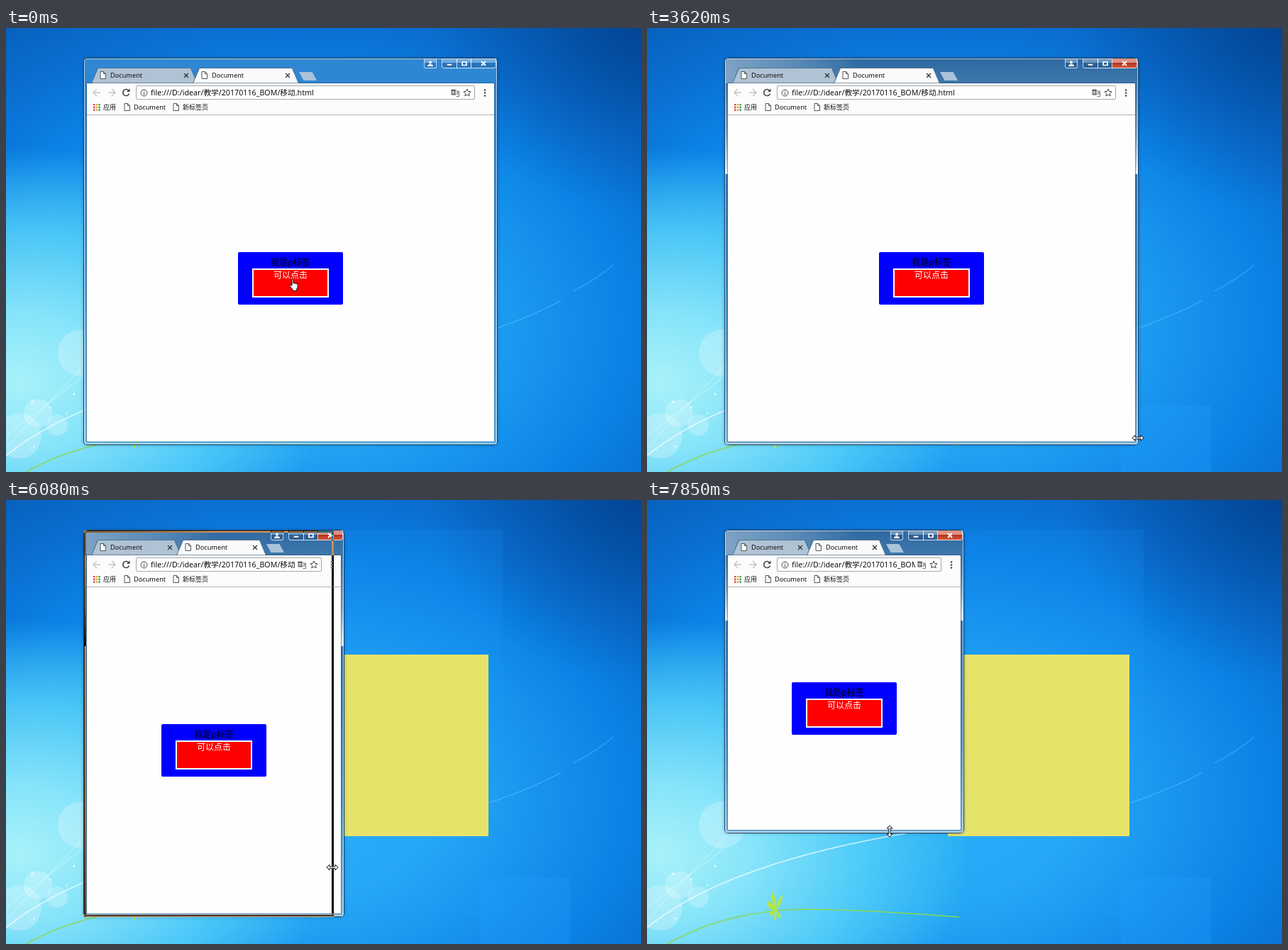
An HTML page that plays this animation: 895 by 626 pixels, repeating every 8 s.

```html
<!DOCTYPE html>
<html lang="zh">
<head>
<meta charset="utf-8">
<title>Document</title>
<style>
html, body { margin: 0; width: 100%; height: 100%; overflow: hidden; }
* { box-sizing: border-box; }
#stage {
  position: relative; width: 895px; height: 626px; overflow: hidden; isolation: isolate;
  font: 9.2px/12px "Noto Sans", "Noto Sans CJK SC", sans-serif; color: #111; white-space: nowrap;
  background:
    radial-gradient(430px 330px at 20px 500px, #a8f2fa 0, rgba(140,232,250,.95) 30%, rgba(90,214,250,.75) 66%, rgba(60,190,250,0)),
    radial-gradient(300px 260px at 895px 0, rgba(0,50,125,.55), rgba(0,50,125,0)),
    radial-gradient(910px 650px at 400px 420px, #2cb2f7 0, #26a9f4 23%, #1894ee 38%, #0b83e6 52%, #0a70d2 65%, #0660ba 80%, #034a96);
}
#stage * { position: absolute; }
#stage svg * { position: static; }
.wall { left: 0; top: 0; }
#win {
  left: 109px; top: 42px; width: calc(var(--r) - 109px); height: calc(var(--b) - 42px);
  border-radius: 6px 6px 5px 5px;
  background: linear-gradient(#2f87d3 36px, #3595e0 45%, rgba(120,200,240,.8));
  box-shadow: inset 0 0 0 1px #173f62, inset 0 0 0 2px rgba(255,255,255,.65), 0 0 4px rgba(0,30,70,.35);
}
#win.on {
  background:
    linear-gradient(115deg, rgba(190,210,225,.55) 0, rgba(150,185,210,.4) 95px, transparent 175px) 0 0 / 100% 36px no-repeat,
    linear-gradient(#2d68a3, #3f78ab 36px, #7fa6c6 20%, #e8f1f8 30%, #3474ac 30%, #4a8fc6 70%, #8cc0e0);
}
.tab {
  left: calc(11px + var(--i) * var(--s)); top: 14px; width: calc(var(--s) + 7px); height: 22px;
  background: #4d7395;
}
.tab, .tab::before { clip-path: polygon(0 100%, 9px 0, calc(100% - 9px) 0, 100% 100%); }
.tab::before { content: ""; position: absolute; inset: 1px 1px 0; background: #b0c3d5; }
.tab.front::before { background: #fafafa; }
.tab span { left: 27px; top: 5px; }
.plus {
  left: calc(18px + 2 * var(--s)); top: 20px; width: 25px; height: 12px; background: #a9c3da;
  clip-path: polygon(0 0, 74% 0, 100% 100%, 26% 100%);
}
.btn {
  top: 1px; height: 14px; border: 1px solid rgba(235,245,255,.75); border-top: 0;
  background: linear-gradient(rgba(255,255,255,.3) 50%, rgba(20,60,110,.25) 50%);
}
.on .close { background: linear-gradient(#d99384 50%, #b5321d 50%, #cf5a3c); }
.btn svg { left: 50%; top: 50%; margin: -5px 0 0 -5px; }
#page { inset: 36px 5px 5px; background: #fefefe; box-shadow: 0 0 0 1px rgba(25,65,105,.5); }
.bar { left: 0; right: 0; top: 0; height: 45px; border-bottom: 1px solid #b2b2b2; background: #fcfcfc; }
.url { left: 69px; right: 27px; top: 3px; height: 20px; border: 1px solid #a6a6a6; border-radius: 2px; background: #fff; }
.url b { left: 20px; right: 36px; top: 0; height: 18px; overflow: hidden; font: 10.7px/18px "Noto Sans", "Noto Sans CJK SC", sans-serif; }
.bar > span { top: 28px; }
#box {
  left: calc(50% - 74px); top: calc(50% + 22.5px - 37px); width: 148px; height: 74px; border-radius: 2px;
  background: #00f; font-size: 12px; line-height: 16px; text-align: center; color: #000;
}
#box p { left: 0; right: 0; top: 7px; margin: 0; }
#box div { left: 20px; top: 23px; width: 108px; height: 41px; border: 2px solid #fff; background: #f00; color: #fff; }
#ghost { left: 110px; top: 43px; border: 3px solid #fff; mix-blend-mode: difference; }
#smudge { left: 467px; top: 102px; width: 208px; height: 20px; background: #f1f1f1; }
.veil { background: rgba(35,155,250,.3); }
#cursor { left: 0; top: 0; overflow: visible; }
#cursor path { fill: #fff; stroke: #111; stroke-width: 1; stroke-linejoin: round; }
</style>
</head>
<body>
<svg width="0" height="0" style="position:absolute">
  <symbol id="doc" viewBox="0 0 9 11"><path d="M1 .5h4.5l3 3v7H1zM5.500 .5v3h3" fill="#fff" stroke="#555"/></symbol>
  <symbol id="x" viewBox="0 0 8 8"><path d="M1 1l6 6M7 1L1 7" stroke="#333" stroke-width="1.3"/></symbol>
</svg>
<div id="stage">
  <svg class="wall" width="895" height="626" fill="none">
    <g fill="#fff" fill-opacity=".24">
      <circle cx="106" cy="458" r="33"/><circle cx="45" cy="543" r="20"/><circle cx="18" cy="575" r="32"/><circle cx="72" cy="560" r="15"/>
    </g>
    <g stroke="#fff" stroke-opacity=".7">
      <path d="M0 592L118 467M0 575L110 490" stroke-opacity=".45"/>
      <path d="M0 603Q110 513 365 470" stroke-width="1.6"/>
    </g>
    <path d="M440 461Q560 464 693 423 760 398 782 384M800 371Q835 352 856 334" stroke="#6cc6fa" stroke-opacity=".65"/>
    <g fill="#fff"><circle cx="37" cy="527" r="1.5"/><circle cx="96" cy="516" r="1.3"/><circle cx="62" cy="535" r="1"/><circle cx="40" cy="590" r="1.3"/><circle cx="85" cy="543" r="1"/></g>
    <path d="M28 626Q110 580 215 577 300 577 440 588" stroke="#86d95a" stroke-width="1.7"/>
    <path d="M179 579Q166 573 170 565 180 569 181 577 173 560 176 552 183 560 182 576 184 562 191 557 192 566 183 578zM178 578Q170 582 174 587 179 584 180 580L179 592Q184 596 182 580 184 590 189 589 188 582 182 578z" fill="#b4e64a"/>
    <rect x="424" y="218" width="256" height="256" fill="#e6e36a"/>
  </svg>
  <div class="veil" id="patch" style="left:668px;top:532px;width:127px;height:94px"></div>
  <div class="veil" id="band" style="left:447px;top:42px;width:253px;height:546px;opacity:.45;z-index:-1"></div>

  <div id="win">
    <div class="tab" style="--i:0"><svg style="left:12px;top:5px" width="9" height="11"><use href="#doc"/></svg><span>Document</span><svg style="right:12px;top:7px" width="8" height="8"><use href="#x"/></svg></div>
    <div class="tab front" style="--i:1"><svg style="left:12px;top:5px" width="9" height="11"><use href="#doc"/></svg><span>Document</span><svg style="right:12px;top:7px" width="8" height="8"><use href="#x"/></svg></div>
    <div class="plus"></div>
    <div class="btn" style="right:86px;width:18px;border-radius:0 0 3px 3px"><svg width="10" height="10" fill="#fff"><circle cx="5" cy="3.500" r="2"/><path d="M1 9q0-3 4-3t4 3z"/></svg></div>
    <div class="btn" style="right:57px;width:22px;border-radius:0 0 0 4px"><svg width="10" height="10"><path d="M1.500 5.500h7v2.500h-7z" fill="#fff" stroke="#456" stroke-width=".5"/></svg></div>
    <div class="btn" style="right:37px;width:21px"><svg width="10" height="10"><path d="M2 3h6v4.500H2z" fill="none" stroke="#fff" stroke-width="1.700"/></svg></div>
    <div class="btn close" style="right:2px;width:36px;border-radius:0 0 4px 0"><svg width="10" height="10"><path d="M2 2l6 6M8 2L2 8" stroke="#fff" stroke-width="1.800"/></svg></div>
    <div id="page">
      <div class="bar">
        <svg width="70" height="45" fill="none" stroke-width="1.400">
          <path d="M19 13H9m5-5l-5 5 5 5M30 13h10m-5-5l5 5-5 5" stroke="#c4c4c4"/>
          <path d="M59 10.500a4.500 4.500 0 1 0 .5 4" stroke="#444" stroke-width="1.600"/><path d="M60.500 7.500v4.500H56z" fill="#444"/>
          <g id="apps"></g>
        </svg>
        <div class="url">
          <svg style="left:5px;top:4px" width="11" height="11" fill="none" stroke="#444"><circle cx="5.500" cy="5.500" r="4.500"/><path d="M5.500 5v3.500M5.500 2.500v1.300"/></svg>
          <b>file:///D:/idear/教学/20170116_BOM/移动.html</b>
          <svg style="right:21px;top:4px" width="12" height="11"><path d="M.5 .5h6l1 8h-7z" fill="#666"/><path d="M6 3h5.500v7.500H7.500" fill="#fff" stroke="#777"/><path d="M4.800 3.500H3a1.500 1.500 0 1 0 1.800 1.500H3.500" stroke="#fff" fill="none"/><path d="M8 5h3M9.500 4v1q0 2-1.500 3M8.500 6l2 2" stroke="#666" fill="none" stroke-width=".8"/></svg>
          <svg style="right:4px;top:3px" width="12" height="12"><path d="M6 1l1.500 3.400 3.600.3-2.700 2.500.8 3.700L6 9l-3.200 1.900.8-3.700L.9 4.700l3.600-.3z" fill="none" stroke="#444"/></svg>
        </div>
        <svg style="right:11px;top:8px" width="4" height="11" fill="#444"><circle cx="2" cy="1.500" r="1.300"/><circle cx="2" cy="5.500" r="1.300"/><circle cx="2" cy="9.500" r="1.300"/></svg>
        <span style="left:23px;font-size:9px">应用</span>
        <svg style="left:52px;top:28px" width="9" height="11"><use href="#doc"/></svg><span style="left:66px">Document</span>
        <svg style="left:121px;top:28px" width="9" height="11"><use href="#doc"/></svg><span style="left:135px;font-size:9px">新标签页</span>
      </div>
      <div id="box"><p>我是p标签</p><div>可以点击</div></div>
    </div>
  </div>
  <div id="smudge"></div>
  <div id="ghost"></div>
  <svg id="cursor" width="20" height="20"><path/></svg>
</div>
<script>
const $ = id => document.getElementById(id);
const stage = $('stage'), win = $('win'), ghost = $('ghost'), cursor = $('cursor');
const glyph = cursor.firstElementChild;

const hues = ['#d8453a', '#e8a020', '#3a9a50', '#3f78d8'];
$('apps').innerHTML = Array.from({length: 9}, (_, i) =>
  `<rect x="${9 + i % 3 * 3.7}" y="${29 + (i / 3 | 0) * 3.7}" width="2.4" height="2.4" fill="${hues[(i + (i / 3 | 0)) % 4]}"/>`).join('');

// Each shape is drawn around its hot spot.
const shapes = {
  arrow: 'M.5 .5v12.500l3-2.800 2 4.600 2-.9-2-4.400h4z',
  hand: 'M-1 10V1.500q1-1.500 2 0V7q1-1 2 .2 1.200-.8 2 .4 1.800-.6 2 1v4l-1.500 3v1.800H0v-1.800L-4 11q-.6-2 1-1.800z',
  ew: 'M-8 0l4-4v2.800h8V-4l4 4-4 4V1.200h-8V4z',
  ns: 'M0-8l4 4H1.200v8H4l-4 4-4-4h2.800v-8H-4z'
};

// start, end, steps, target x, target y, shape
const moves = [
  [410, 675, 3, 668, 532, 'arrow'],
  [810, 810, 1, 783, 606, 'arrow'],
  [945, 1340, 4, 465, 356, 'arrow'],
  [1490, 1490, 1, 436, 340, 'hand'],
  [1645, 1800, 2, 402, 354, 'hand'],
  [2260, 2260, 1, 525, 405, 'arrow'],
  [2387, 2770, 4, 696, 582, 'arrow'],
  [3070, 3340, 3, 692, 578, 'ew'],
  [3770, 4230, 4, 475.5, 541, 'ew'],
  [5350, 5770, 4, 474, 521, 'ew'],
  [6080, 6200, 2, 445, 515, 'ew'],
  [6470, 6900, 4, 350, 574, 'arrow'],
  [7040, 7040, 1, 342, 586, 'ns'],
  [7190, 7720, 5, 342, 467, 'ns']
];

function pointer(t) {
  let p = {x: 404, y: 353, kind: 'hand'};
  for (const [start, end, n, x, y, kind] of moves) {
    if (t < start) break;
    const done = n > 1 ? Math.min(n, 1 + Math.floor((t - start) / (end - start) * (n - 1))) : 1;
    p = {x: p.x + (x - p.x) * done / n, y: p.y + (y - p.y) * done / n, kind};
  }
  return p;
}

const within = (t, a, b) => t >= a && t < b;
const show = (el, on) => { el.style.display = on ? 'block' : 'none'; };

function render(t) {
  const p = pointer(t);
  const [r, s] = t < 4950 ? [693, 143] : t < 6320 ? [477, 120] : [447, 105];
  const b = t < 7850 ? 588 : 470;
  stage.style.setProperty('--r', r + 'px');
  stage.style.setProperty('--s', s + 'px');
  stage.style.setProperty('--b', b + 'px');
  win.className = t < 3620 ? '' : 'on';

  const wide = within(t, 3770, 4950) || within(t, 6080, 6320);
  const tall = within(t, 7190, 7850);
  show(ghost, wide || tall);
  ghost.style.width = (wide ? Math.round(p.x + 2) : r) - 110 + 'px';
  ghost.style.height = (tall ? Math.round(p.y + 3) : b) - 43 + 'px';

  show($('patch'), t >= 810);
  show($('band'), t >= 4950);
  show($('smudge'), within(t, 4230, 4950));
  glyph.setAttribute('d', shapes[p.kind]);
  cursor.style.transform = `translate(${Math.round(p.x)}px, ${Math.round(p.y)}px)`;
}

let origin;
function tick(now) {
  origin ??= now;
  render((now - origin) % 8000);
  requestAnimationFrame(tick);
}
render(0);
requestAnimationFrame(tick);
</script>
</body>
</html>
```
